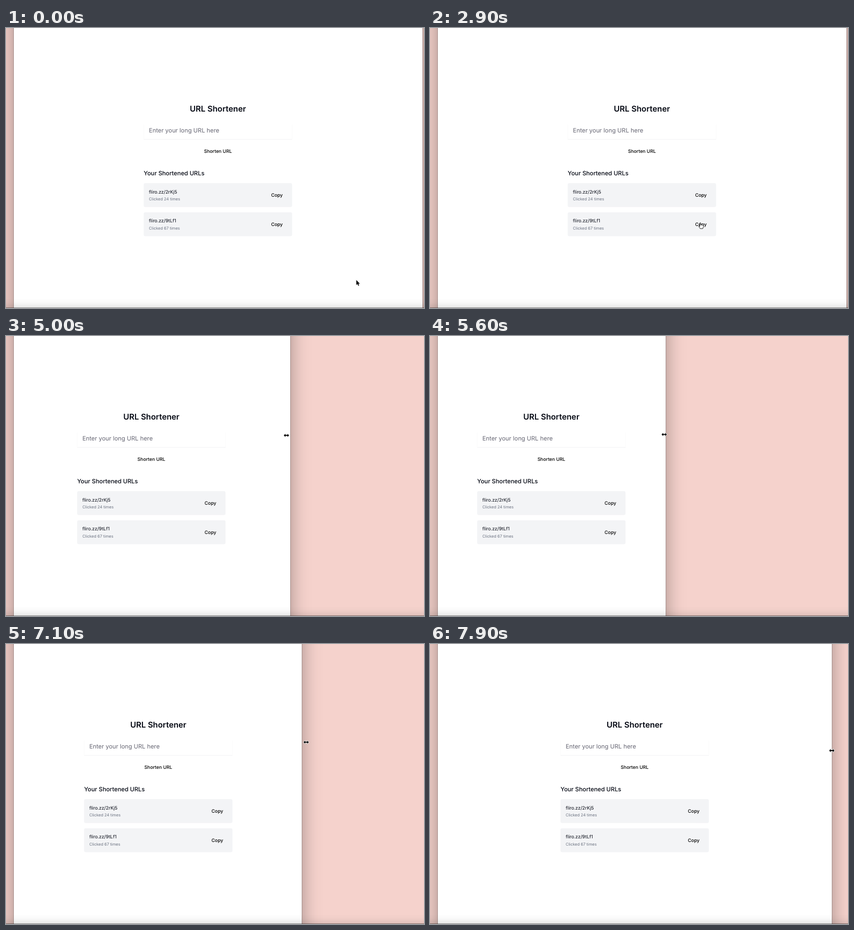
These frames come from a looping animation (800 px wide and 536 px high, 8 s). An HTML page:

```html
<!DOCTYPE html>
<html lang="en">
<head>
<meta charset="utf-8">
<title>Resizing a link page</title>
<style>
  html, body { margin: 0; width: 100%; height: 100%; overflow: hidden; }
  #stage { position: absolute; inset: 0; overflow: hidden; background: #f5d2cc; }
  #window {
    position: absolute; left: 15px; top: -80px; height: 700px; background: #fff;
    box-shadow: 0 0 0 .6px rgba(0,0,0,.3), 0 0 34px rgba(0,0,0,.34);
  }
  #floor {
    position: absolute; left: 0; top: 517px; width: 100%; height: 18px;
    background: linear-gradient(rgba(0,0,0,0), rgba(0,0,0,.025) 50%, rgba(0,0,0,.09));
    border-bottom: 1px solid rgba(0,0,0,.48);
  }
  svg { position: absolute; left: 0; top: 0; width: 800px; height: 536px; }
  text { font-family: Inter, sans-serif; fill: #030712; text-rendering: geometricPrecision; }
  .title { font-size: 15.3px; font-weight: 600; text-anchor: middle; }
  .hint { font-size: 11.4px; fill: #666673; }
  .button { font-size: 8.88px; font-weight: 500; fill: #000; text-anchor: middle; }
  .heading { font-size: 11.4px; font-weight: 500; }
  .link { font-size: 8.88px; }
  .count { font-size: 7.6px; fill: #6b7280; }
  .outline { stroke: #fff; stroke-width: 1.4; stroke-linejoin: round; paint-order: stroke; }
  #cursor { filter: drop-shadow(0 .6px .6px rgba(0,0,0,.3)); }
</style>
</head>
<body>
<div id="stage">
  <div id="window"></div>
  <svg>
    <!-- page content, laid out around its centre line -->
    <g id="page">
      <text class="title" y="160">URL Shortener</text>
      <path d="M-142 213.3H142" stroke="#f0f0f2" stroke-width=".8"/>
      <path d="M-142 185V213M142 185V213" stroke="#f9f9fa" stroke-width=".7"/>
      <text class="hint" x="-132" y="200.3">Enter your long URL here</text>
      <path id="caret" d="M-131.7 190V203.5" stroke="#030712" stroke-width=".9"/>
      <text class="button" y="239.2">Shorten URL</text>
      <text class="heading" x="-142" y="282">Your Shortened URLs</text>
      <g id="cards"></g>
    </g>
  </svg>
  <div id="floor"></div>
  <svg>
    <g id="cursor">
      <path id="arrow" class="outline" d="M-.5.4V10L1.7 8 3.2 11.4 4.7 10.8 3.3 7.5H6.2Z"/>
      <path id="beam" fill="none" stroke="#222" stroke-width=".9" d="M-2-5.5Q0-5.5 0-4V4Q0 5.5-2 5.5M2-5.5Q0-5.5 0-4M0 4Q0 5.5 2 5.5"/>
      <path id="hand" fill="#fff" stroke="#000" stroke-width=".8" stroke-linejoin="round"
        d="M2.5 8V1.2Q3.3 0 4.1 1.2V5Q5 4.2 5.8 5.2 6.7 4.5 7.4 5.5 8.8 4.9 9.2 6.3V9L8 12H3.2L.2 7.7Q.7 6.3 2.5 8Z"/>
      <path id="resize" class="outline" d="M-5 0L-2-3V-.9H2V-3L5 0 2 3V.9H-2V3Z"/>
      <path id="right" class="outline" d="M-4-.9H1V-3L4 0 1 3V.9H-4Z"/>
    </g>
  </svg>
</div>
<script>
const LOOP = 8000, STEP = 100;
const LEFT = 15, FULL_EDGE = 796.7, MIN_EDGE = 367.5;
const DRAG_START = 4600, FRAME_LAG = 18, PAGE_LAG = 13;
const $ = id => document.getElementById(id);

const links = [['fliro.zz/2rKj5', 24], ['fliro.zz/9tLf1', 67]];
$('cards').innerHTML = links.map(([link, clicks], i) => `
  <g transform="translate(0 ${i * 55.7})">
    <rect x="-142" y="297" width="284" height="45.7" rx="3.2" fill="#f3f4f6"/>
    <text class="link" x="-132" y="316.8">${link}</text>
    <text class="count" x="-132" y="330.2">Clicked ${clicks} times</text>
    <text class="button" x="113" y="323.2">Copy</text>
  </g>`).join('');

const smooth = u => u * u * (3 - 2 * u);
const easeOut = u => 1 - (1 - u) ** 2.45;

// each move glides the pointer on from where the last one left it
const home = { x: 671, y: 482 };
const moves = [
  { from: 0, to: 500, x: 785, y: 313 },
  { from: 600, to: 1400, x: 432, y: 197 },
  { from: 1500, to: 1600, x: 469, y: 262 },
  { from: 1600, to: 1800, x: 465, y: 307 },
  { from: 2000, to: 2300, x: 512, y: 323 },
  { from: 2500, to: 2900, x: 514, y: 372 },
  { from: 3100, to: 3400, x: 279, y: 262 },
  { from: 3400, to: 4000, x: FULL_EDGE, y: 191 },
  { from: DRAG_START, to: 5500, x: 456, y: 190, ease: easeOut },
  { from: 5500, to: 6100, x: 352, y: 169.5 },
  { from: 6400, to: 7740, x: 769, y: 204 }
];
const shapes = [
  [0, 'arrow'], [1300, 'beam'], [1600, 'arrow'], [2300, 'hand'], [3200, 'arrow'],
  [4000, 'none'], [4300, 'resize'], [6300, 'right'], [6500, 'resize']
];

function pointerAt(t) {
  let { x, y } = home;
  for (const move of moves) {
    if (t <= move.from) break;
    const k = (move.ease ?? smooth)(Math.min(1, (t - move.from) / (move.to - move.from)));
    x += (move.x - x) * k;
    y += (move.y - y) * k;
  }
  return { x, y };
}

// the window and its layout trail the dragging pointer a little
const edgeAt = t => Math.max(MIN_EDGE, pointerAt(Math.max(t, DRAG_START)).x);

function draw(t) {
  const { x, y } = pointerAt(t);
  const center = (LEFT + edgeAt(t - PAGE_LAG)) / 2 - .3;
  $('window').style.width = edgeAt(t - FRAME_LAG) - LEFT + 'px';
  $('page').setAttribute('transform', `translate(${center} 0)`);
  $('caret').style.display = t >= 1400 && t < 1800 ? '' : 'none';
  $('cursor').setAttribute('transform', `translate(${x} ${y})`);
  const shape = shapes.findLast(([start]) => start <= t)[1];
  for (const path of $('cursor').children) path.style.display = path.id === shape ? '' : 'none';
}

const start = performance.now();
function tick() {
  const t = (performance.now() - start) % LOOP;
  draw(Math.floor(t / STEP) * STEP);
  requestAnimationFrame(tick);
}
tick();
</script>
</body>
</html>
```
